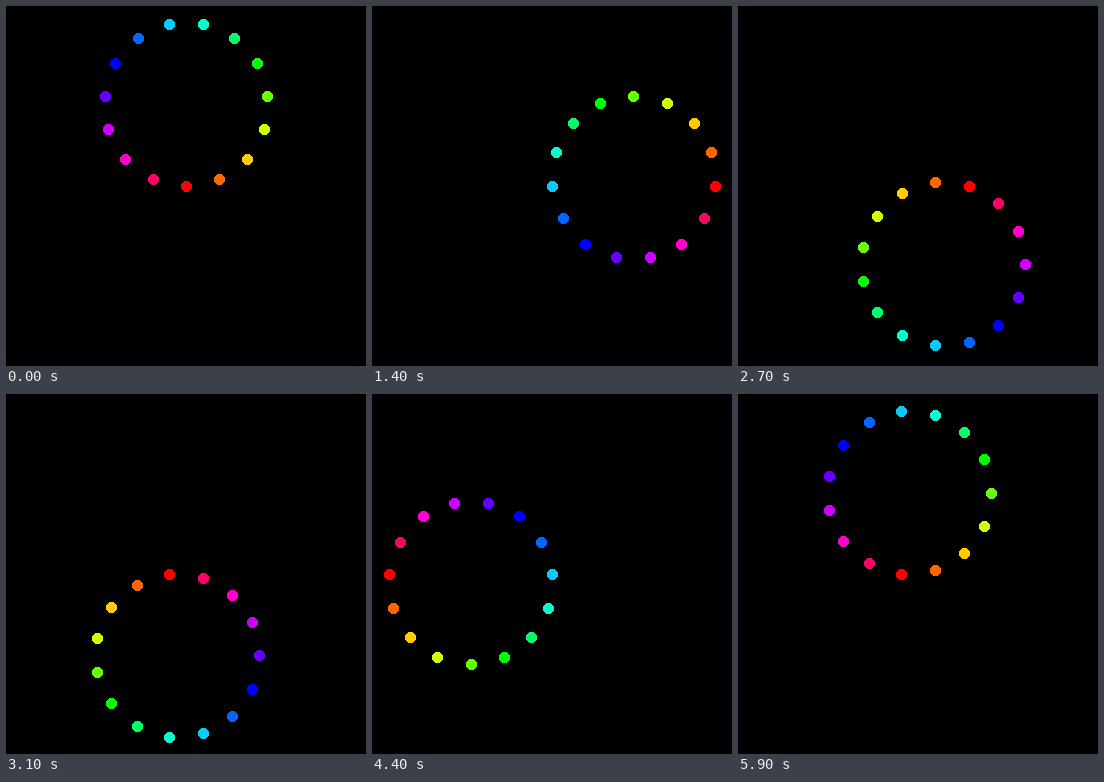
Recreate the animation shown at these times as an HTML page. Size 360 by 360 pixels, loop 6000 ms.

```html
<!DOCTYPE html>
<html>
<head>
<meta charset="utf-8">
<title>Rolling ring</title>
<style>
  html, body { margin: 0; width: 100%; height: 100%; overflow: hidden; background: #000; }
  svg { display: block; width: 360px; height: 360px; }
</style>
</head>
<body>
<svg viewBox="0 0 360 360" shape-rendering="crispEdges"></svg>
<script>
const COUNT = 15, CENTER = 180, REACH = 360 / 2.2;
const STEP = 100, LOOP = 6000;
const svg = document.querySelector('svg');

const dots = Array.from({ length: COUNT }, (_, i) => {
  const dot = document.createElementNS('http://www.w3.org/2000/svg', 'circle');
  dot.setAttribute('r', 5.5);
  dot.setAttribute('fill', `hsl(${i * 360 / COUNT}, 100%, 50%)`);
  return svg.appendChild(dot);
});

// Snap to the middle of a pixel
const snap = v => Math.round(CENTER + v) + 0.5;

// Each dot swings along its own straight line; together they form a rolling ring
function draw() {
  const time = Math.floor(performance.now() % LOOP / STEP) * STEP;
  const turn = time / LOOP * 2 * Math.PI;
  dots.forEach((dot, i) => {
    const tilt = i * Math.PI / COUNT;
    const swing = REACH * Math.sin(turn + tilt);
    dot.setAttribute('cx', snap(swing * Math.cos(tilt)));
    dot.setAttribute('cy', snap(-swing * Math.sin(tilt)));
  });
  requestAnimationFrame(draw);
}
draw();
</script>
</body>
</html>
```
